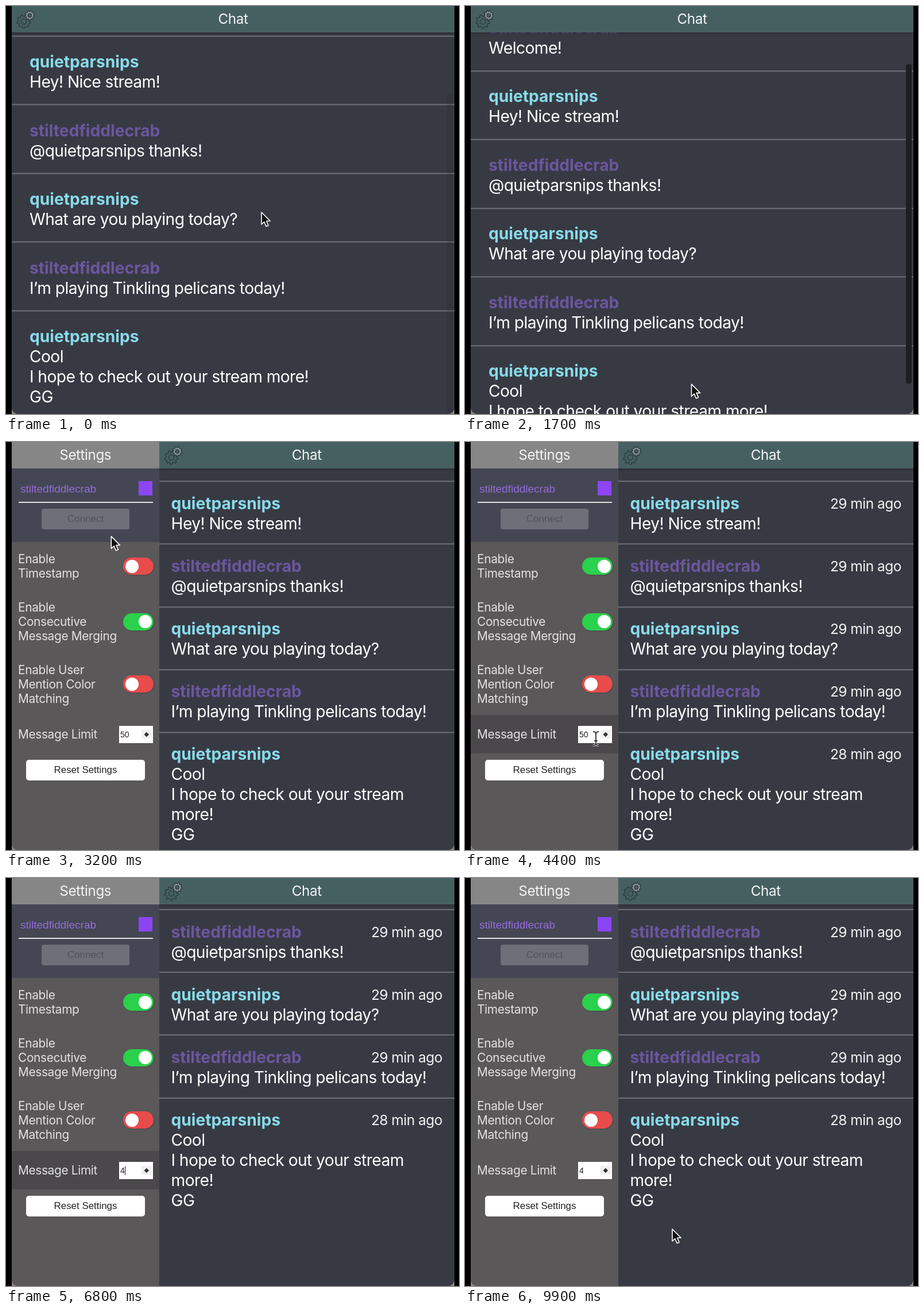
Recreate the animation shown at these times as an HTML page. Size 789 px wide and 710 px high, loop 10 s.

```html
<!DOCTYPE html>
<html lang="en">
<head>
<meta charset="utf-8">
<title>Chat</title>
<style>
  html, body { margin: 0; width: 100%; height: 100%; overflow: hidden; background: #000; }
  * { box-sizing: border-box; }
  #stage { position: absolute; width: 789px; height: 710px; overflow: hidden;
    font: 28.2px/35px Inter, sans-serif; letter-spacing: -.02em; font-optical-sizing: none; color: #fff; }
  #desk { position: absolute; left: 10px; top: 690px; width: 771px; height: 20px; background: #8d807d; }
  #window { position: absolute; left: 10px; top: 0; width: 771px; height: 710px; overflow: hidden;
    border-radius: 0 0 12px 12px; background: #383a43; }
  #chat { position: absolute; top: 0; right: 0; bottom: 0; overflow: hidden; background: #383a43; }
  header { position: absolute; z-index: 1; top: 0; left: 0; right: 0; height: 46px; line-height: 46px;
    font-size: 24.2px; letter-spacing: -.017em; text-align: center; color: #f4f4f4; background: #466062; }
  #chat header { box-shadow: 0 1px 4px #26272e; }
  #gear { position: absolute; left: 0; top: 0; }

  #list { position: absolute; top: 54px; left: 0; right: 0; }
  .message { position: relative; border-top: 2px solid #6d6f7d; }
  .message b { display: block; letter-spacing: 0; color: #88dbea; }
  .message.host b { color: #6b569f; }
  .message time { position: absolute; right: 21px; font-size: 24.6px; color: #f2f2f2; }
  .message p { margin: 0; }
  #bar { position: absolute; left: 758px; width: 10px; height: 556px; border-radius: 4px; background: #1d1e22; }
  #paused { position: absolute; left: 300px; top: 637px; width: 171px; height: 56px; line-height: 50px;
    border: 3px solid #6c6a6b; border-radius: 8px; background: #3a393d; color: #dedede;
    font-size: 24.2px; letter-spacing: -.015em; text-align: center; }

  #settings { position: absolute; top: 0; width: 256.5px; height: 710px; background: #5b585a;
    color: #e2e2e2; font-size: 20.8px; line-height: 25px; letter-spacing: -.015em; }
  #settings header { background: #868686; }
  #account { position: absolute; top: 46px; width: 100%; height: 128px; background: #444653; }
  #account *, .button { position: absolute; font-family: "Liberation Sans", Arial, sans-serif; letter-spacing: 0; }
  #user { left: 15px; top: 23px; font-size: 19px; color: #946bdd; }
  #badge { left: 221px; top: 22px; width: 24px; height: 25px; background: #8c45f5; }
  #rule { left: 12px; top: 58px; width: 234px; height: 2px; background: #e2e2e2; }
  #connect { left: 52px; top: 70px; width: 153px; height: 36px; line-height: 35px; border-radius: 4px;
    font-size: 17px; text-align: center; color: #50535d; background: #6d7078; }
  .row { position: absolute; width: 100%; padding-left: 11px; display: flex; align-items: center; }
  .row.hover { background: #4a484b; }
  .switch { position: absolute; left: 194px; top: calc(50% - 15px); width: 53px; height: 30px;
    border-radius: 15px; box-shadow: 1px 1px 2px #3337; }
  .switch i { position: absolute; top: 3.5px; width: 23px; height: 23px; border-radius: 50%; background: #fff; }
  #limit { position: absolute; left: 187px; top: 19px; width: 59px; height: 30px; padding-left: 2px;
    background: #fff; color: #222; font: 14px/30px "Liberation Sans", Arial, sans-serif; letter-spacing: 0; }
  #caret { display: inline-block; width: 1px; height: 15px; vertical-align: -3px; background: #111; }
  #spin { position: absolute; left: 39px; top: 7px; width: 18px; height: 15px; background: #efefef; }
  #spin::after { content: ""; position: absolute; left: 6.2px; top: 4.7px; width: 5.6px; height: 5.6px;
    background: #333; transform: rotate(45deg); }
  .button { left: 25px; top: 553px; width: 207px; height: 36px; line-height: 36px; border-radius: 5px;
    font-size: 16.9px; text-align: center; color: #222; background: #fff; }
  #cursor { position: absolute; z-index: 2; left: 0; top: 0; overflow: visible; }
</style>
</head>
<body>
<div id="stage">
  <div id="desk"></div>
  <div id="window">
    <div id="settings">
      <header>Settings</header>
      <div id="account">
        <span id="user">stiltedfiddlecrab</span><i id="badge"></i><i id="rule"></i><span id="connect">Connect</span>
      </div>
      <div class="row" style="top:174px;height:84px">Enable<br>Timestamp<span class="switch"><i></i></span></div>
      <div class="row" style="top:258px;height:109px">Enable<br>Consecutive<br>Message Merging<span class="switch"><i></i></span></div>
      <div class="row" style="top:367px;height:108px">Enable User<br>Mention Color<br>Matching<span class="switch"><i></i></span></div>
      <div class="row" style="top:475px;height:67px">Message Limit
        <div id="limit"><span id="value"></span><i id="caret"></i><i id="spin"></i></div>
      </div>
      <div class="button">Reset Settings</div>
    </div>
    <div id="chat">
      <header>Chat<svg id="gear" width="46" height="46" fill="none" stroke="#2c3b3e" stroke-width="1.4"></svg></header>
      <div id="list"></div>
    </div>
    <div id="bar"></div>
    <div id="paused">Chat Paused</div>
  </div>
  <svg id="cursor" width="20" height="28" stroke-linejoin="round">
    <path id="arrow" d="M0 0V21L4.8 16.7L8.2 24.6L12 23L8.7 15.2H15.2Z" fill="#111" stroke="#fff" stroke-width="1.6"/>
    <g id="beam" fill="none">
      <path d="M-5 -12Q0 -12 0 -8V8Q0 12 -5 12M5 -12Q0 -12 0 -8M0 8Q0 12 5 12M-3 4H3" stroke="#fff" stroke-width="3.4"/>
      <path d="M-5 -12Q0 -12 0 -8V8Q0 12 -5 12M5 -12Q0 -12 0 -8M0 8Q0 12 5 12M-3 4H3" stroke="#111" stroke-width="1.6"/>
    </g>
  </svg>
</div>
<script>
const LOOP = 10000, PANEL = 256.5, BOTTOM = 718.5;
const GUEST = 'quietparsnips', HOST = 'stiltedfiddlecrab';
const $ = id => document.getElementById(id);
const clamp = x => Math.max(0, Math.min(1, x));
const lerp = (a, b, k) => a + (b - a) * k;
const ease = x => x * x * (3 - 2 * x);
const ramp = (t, from, to) => ease(clamp((t - from) / (to - from)));
const show = (el, on) => { el.style.display = on ? '' : 'none'; };

const messages = [
  [HOST, 'Welcome!'],
  [GUEST, 'Hey! Nice stream!'],
  [HOST, '@' + GUEST + ' thanks!'],
  [GUEST, 'What are you playing today?'],
  [HOST, 'I’m playing Tinkling pelicans today!'],
  [GUEST, 'Cool', 'I hope to check out your stream more!', 'GG']
].map(([name, ...lines], i) => {
  const el = document.createElement('div');
  el.className = name === HOST ? 'message host' : 'message';
  el.innerHTML = `<time>${i === 5 ? 28 : 29} min ago</time><b>${name}</b>` +
    lines.map(line => `<p>${line}</p>`).join('');
  $('list').append(el);
  return el;
});
const stamps = document.querySelectorAll('time');
const rows = [...document.querySelectorAll('.row')];
const switches = document.querySelectorAll('.switch');

function gearPath(cx, cy, radius, teeth) {
  const points = [];
  for (let i = 0; i < teeth * 4; i++) {
    const r = i % 4 < 2 ? radius : radius * .77;
    const a = (i + .5) / (teeth * 4) * 2 * Math.PI;
    points.push((cx + r * Math.cos(a)).toFixed(2) + ' ' + (cy + r * Math.sin(a)).toFixed(2));
  }
  return `M${points.join('L')}Z`;
}
$('gear').innerHTML = `<path d="${gearPath(21, 27, 12, 9)}"/><circle cx="21" cy="27" r="4.6"/>
  <path d="${gearPath(31.3, 16.3, 8.6, 9)}" fill="#8b9698"/><circle cx="31.3" cy="16.3" r="3.2" fill="#466062"/>`;

// time, x, y of the pointer tip
const path = [
  [0, 445, 359], [200, 445, 359], [500, 375, 459], [1000, 375, 459], [1350, 400, 668],
  [1650, 400, 668], [2350, 34, 18], [2800, 34, 18], [3400, 235, 215], [3750, 235, 215],
  [4150, 228, 512], [4400, 228, 516], [7800, 228, 516], [8500, 361, 611], [LOOP, 361, 611]
];
function pointer(t) {
  const i = path.findIndex(p => p[0] > t), [t0, x0, y0] = path[i - 1], [t1, x1, y1] = path[i];
  const k = ramp(t, t0, t1);
  return [lerp(x0, x1, k), lerp(y0, y1, k)];
}

// time, content of the limit field
const edits = [[0, '50'], [5000, '5'], [5200, ''], [6600, '4']];

function setSwitch(el, k) {
  el.style.background = k > .5 ? '#2ad14b' : '#e94b4b';
  el.firstChild.style.left = lerp(3.5, 26.5, k) + 'px';
}

function render(t) {
  const open = ramp(t, 2700, 3050);
  $('settings').style.left = PANEL * (open - 1) + 'px';
  $('chat').style.left = PANEL * open + 'px';

  const [editTime, value] = edits.filter(e => e[0] <= t).pop();
  $('value').textContent = value;
  show($('caret'), t > 4600 && t < 8600 && (t - Math.max(editTime, 4600)) % 1000 < 500);

  const top = lerp(26.5, 20.5, open), bottom = lerp(21, 16.7, open), side = lerp(31, 21, open);
  messages.forEach((el, i) => {
    show(el, i >= messages.length - Number(value));
    el.style.padding = `${top}px 30px ${bottom}px ${side}px`;
  });
  stamps.forEach(el => show(el, t >= 3600));

  const scroll = 1 - ramp(t, 180, 500) + ramp(t, 1500, 1900);
  const range = Math.max(0, 54 + $('list').getBoundingClientRect().height - BOTTOM);
  $('list').style.transform = `translateY(${-range * scroll}px)`;
  $('bar').style.top = lerp(49, 152, scroll) + 'px';
  $('bar').style.opacity = (.15 + .85 * ramp(t, 50, 250)) * (1 - ramp(t, 2650, 2850));
  show($('paused'), t >= 250 && t < 1600);

  const [x, y] = pointer(t);
  rows.forEach(el => {
    const over = open === 1 && x < 266 && y >= el.offsetTop && y < el.offsetTop + el.offsetHeight;
    el.classList.toggle('hover', over);
  });
  setSwitch(switches[0], ramp(t, 3580, 3780));
  setSwitch(switches[1], 1);
  setSwitch(switches[2], 0);

  const overField = open === 1 && x > 197 && x < 255 && y > 494 && y < 524;
  $('cursor').style.transform = `translate(${x}px, ${y}px)`;
  show($('cursor'), t < 5000 || t > 7800);
  show($('arrow'), !overField);
  show($('beam'), overField);
}

function frame() {
  render(performance.now() % LOOP);
  requestAnimationFrame(frame);
}
frame();
</script>
</body>
</html>
```
